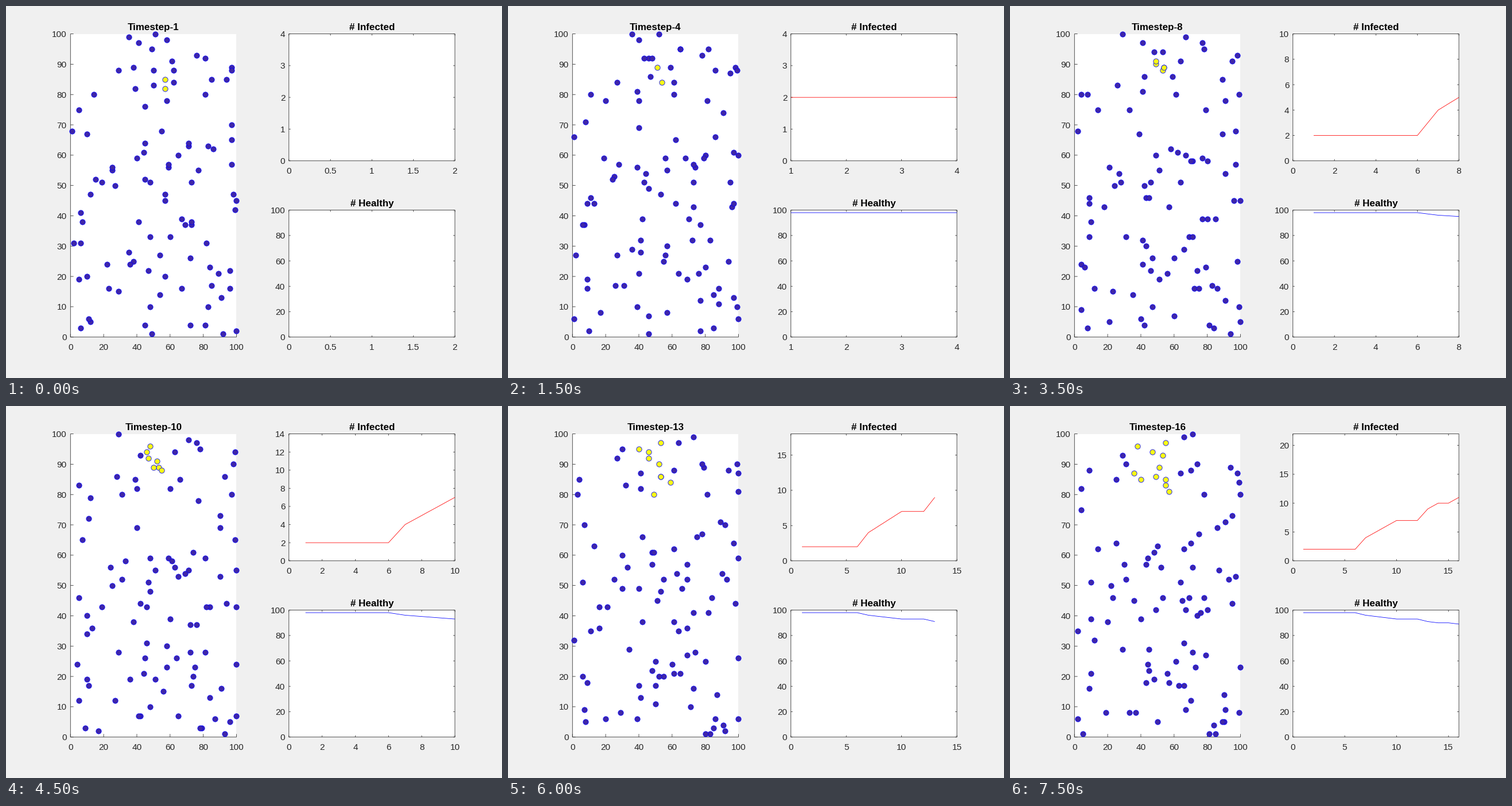
Recreate the animation shown at these times as a matplotlib script. Size 864 px wide and 648 px high, loop 8000 ms.

```python
import numpy as np
import matplotlib.pyplot as plt
from matplotlib.animation import FuncAnimation

W, H = 864, 648
STEPS = 16
PEOPLE = 100
INK = "#262626"
THIN = 0.8
plt.rcParams["font.family"] = "Liberation Sans"

steps = np.arange(1, STEPS + 1)
cases = np.array([2] * 6 + [4, 5, 6, 7, 7, 7, 9, 10, 10, 11])

# The first two carriers pass through these points
KEYS = [1, 4, 8, 12, 16]
CARRIERS = [[(57, 85), (51, 89), (49, 90), (45, 94), (47, 94)],
            [(57, 82), (54, 84), (54, 89), (52, 89), (53, 93)]]


def simulate(seed=7):
    """Random walk on a grid; each new case is the healthy walker nearest to a sick one."""
    rng = np.random.default_rng(seed)
    walk = np.empty((STEPS, PEOPLE, 2))
    walk[0] = rng.integers(1, 101, (PEOPLE, 2))
    for i in range(1, STEPS):
        move = rng.integers(-3, 4, (PEOPLE, 2))
        walk[i] = np.clip(walk[i - 1] + move, 1, 100)
    for n, path in enumerate(CARRIERS):
        for k, coord in enumerate(zip(*path)):
            walk[:, n, k] = np.round(np.interp(steps, KEYS, coord))

    sick = np.zeros((STEPS, PEOPLE), bool)
    ill = np.arange(PEOPLE) < len(CARRIERS)
    for i, pos in enumerate(walk):
        while ill.sum() < cases[i]:
            gap = np.linalg.norm(pos[:, None] - pos[ill], axis=2).min(axis=1)
            ill[np.where(ill, np.inf, gap).argmin()] = True
        sick[i] = ill
    return walk, sick


walk, sick = simulate()

fig = plt.figure(figsize=(W / 72, H / 72), dpi=72, facecolor="#f0f0f0")
ax = fig.add_axes([0, 0, 1, 1])


def line(x, y, color=INK, z=2):
    ax.plot(x, y, color=color, lw=THIN, zorder=z, solid_capstyle="butt", snap=False)


def label(x, y, text, ha="center", size=15.43, **kw):
    ax.text(x, y, text, ha=ha, va="baseline", size=size, **kw)


class Panel:
    def __init__(self, left, top, height, tick, boxed):
        self.left, self.top, self.tick, self.boxed = left, top, tick, boxed
        self.w, self.h = 0.3347 * W, height
        self.right, self.bottom = left + self.w, top + height

    def to_px(self, x, y):
        (x0, x1, _), (y0, y1, _) = self.xr, self.yr
        return (self.left + (np.asarray(x) - x0) / (x1 - x0) * self.w,
                self.bottom - (np.asarray(y) - y0) / (y1 - y0) * self.h)

    def draw(self, title, xr, yr):
        """Ranges are (low, high, tick step)."""
        self.xr, self.yr = xr, yr
        l, r, t, b, k = self.left, self.right, self.top, self.bottom, self.tick
        ax.fill([l, r, r, l], [t, t, b, b], color="white", lw=0, zorder=1)
        line([l, l, r], [t, b, b])
        if self.boxed:
            line([l, r, r], [t, t, b])
        for v in np.arange(xr[0], xr[1] + 1e-6, xr[2]):
            x = self.to_px(v, yr[0])[0]
            line([x, x], [b, b - k])
            if self.boxed:
                line([x, x], [t, t + k])
            label(x, b + 22, f"{v:g}", color=INK)
        for v in np.arange(yr[0], yr[1] + 1e-6, yr[2]):
            y = self.to_px(xr[0], v)[1]
            line([l, l + k], [y, y])
            if self.boxed:
                line([r, r - k], [y, y])
            label(l - 6.5, y + 5.5, f"{v:g}", ha="right", color=INK)
        label((l + r) / 2, t - 6.3, title, size=16.97, weight="bold", color="black")


field = Panel(112.3, 48.6, 528.1, 5.3, False)
sick_plot = Panel(492.8, 48.6, 221.1, 2.9, True)
well_plot = Panel(492.8, 355.6, 221.1, 2.9, True)


def time_range(s):
    if s == 1:
        return 0, 2, 0.5
    if s <= 6:
        return 1, s, {2: 0.2, 3: 0.5}.get(s, 1)
    if s <= 10 or s == 12:
        return 0, s + s % 2, 2
    return 0, 15 if 13 <= s <= 15 else s, 5


def count_range(n):
    top = 2 * n
    return 0, top, 1 if top <= 4 else 2 if top <= 14 else 5


def dots(xy, color):
    x, y = field.to_px(xy[:, 0], xy[:, 1])
    ax.scatter(x, y, s=9.26 ** 2, c=color, edgecolors="#0000ff",
               linewidths=THIN, zorder=4, snap=False)


def draw(i):
    ax.clear()
    ax.set(xlim=(0, W), ylim=(H, 0))
    ax.axis("off")
    s = i + 1

    field.draw(f"Timestep-{s}", (0, 100, 20), (0, 100, 10))
    dots(walk[i][sick[i]], "#f9fb15")
    dots(walk[i][~sick[i]], "#3e26a8")

    sick_plot.draw("# Infected", time_range(s), count_range(cases[i]))
    well_plot.draw("# Healthy", time_range(s), (0, 100, 20))
    if s > 1:
        line(*sick_plot.to_px(steps[:s], cases[:s]), "#ff0000", 3)
        line(*well_plot.to_px(steps[:s], PEOPLE - cases[:s]), "#0000ff", 3)
    return []


anim = FuncAnimation(fig, draw, frames=STEPS, interval=500, repeat=True, repeat_delay=0)
plt.show()
```
